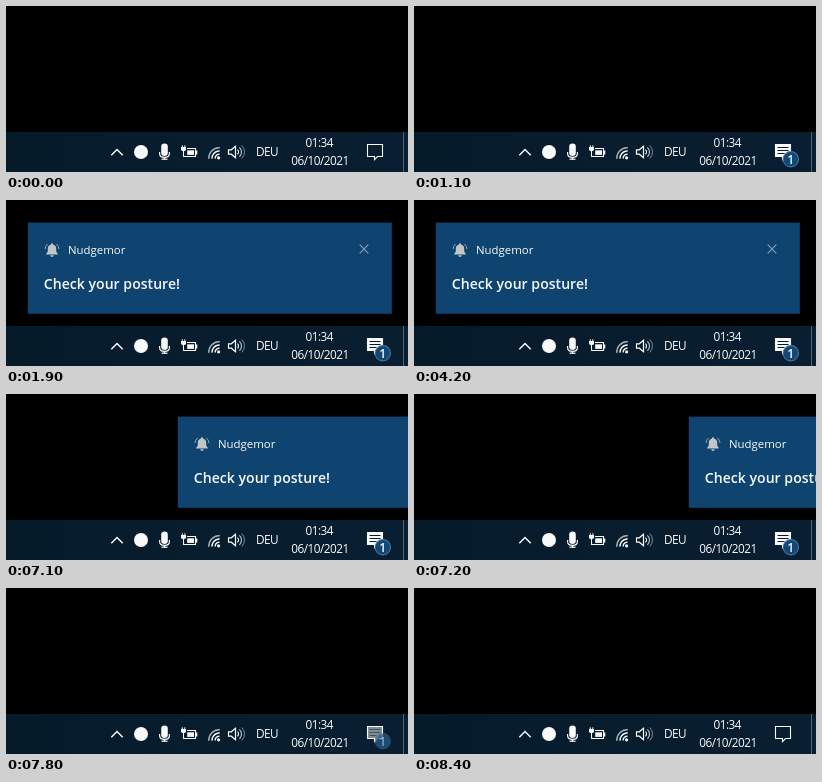
Write an HTML page with a canvas that moves like this. It is 402x166 px and loops after 8.6 s.

```html
<!DOCTYPE html>
<html lang="en">
<head>
<meta charset="utf-8">
<title>Taskbar reminder</title>
<style>
  html, body { margin: 0; width: 100%; height: 100%; overflow: hidden; background: #000; }
  canvas { display: block; width: 402px; height: 166px; }
</style>
</head>
<body>
<canvas id="stage" width="402" height="166"></canvas>
<script>
const ctx = document.getElementById('stage').getContext('2d');
const LOOP = 8600;
const STEP = 100;
const FONT = '"Open Sans", "Noto Sans", sans-serif';
const WHITE = '#f8fafa';
const BAR = '#071c2d';

function text(value, x, y, size, { weight = 500, align = 'left', tracking = 0 } = {}) {
  ctx.font = `${weight} ${size}px ${FONT}`;
  ctx.letterSpacing = `${tracking}px`;
  ctx.textAlign = align;
  ctx.fillStyle = WHITE;
  ctx.fillText(value, x, y);
}

function trayText(value, x, y) {
  text(value, x, y, 11.8, { align: 'center', tracking: -0.5 });
}

function stroke(path, width = 1.2, color = WHITE) {
  ctx.lineWidth = width;
  ctx.strokeStyle = color;
  ctx.stroke(new Path2D(path));
}

function fill(path, color = WHITE) {
  ctx.fillStyle = color;
  ctx.fill(new Path2D(path));
}

function rect(x, y, w, h, color = WHITE) {
  ctx.fillStyle = color;
  ctx.fillRect(x, y, w, h);
}

function disc(x, y, r, color = WHITE) {
  ctx.beginPath();
  ctx.arc(x, y, r, 0, Math.PI * 2);
  ctx.fillStyle = color;
  ctx.fill();
}

function arc(x, y, r, from, to, width, color = WHITE) {
  ctx.beginPath();
  ctx.arc(x, y, r, from * Math.PI, to * Math.PI);
  ctx.lineWidth = width;
  ctx.strokeStyle = color;
  ctx.stroke();
}

function drawTray() {
  stroke('M105.3 149.3 L111 143.4 L116.7 149.3', 1.4);
  disc(135, 146, 7);

  // microphone
  fill('M155.2 140.5 a3.3 3 0 0 1 6.6 0 v6.5 a3.3 3 0 0 1 -6.6 0 Z');
  stroke('M153.6 146 v1.7 q0 3.6 4.9 3.6 q4.9 0 4.9 -3.6 v-1.7', 1.2);
  rect(157.8, 151, 1.4, 2.5);
  rect(155.5, 152.6, 6, 1.2);

  // charging battery
  stroke('M181 142.5 H189.5 V150.5 H177.5 V148', 1.1);
  rect(181.2, 144.3, 6.8, 4.6);
  rect(190, 144.5, 1.3, 4);
  fill('M175 141 h5 v2.3 q0 2 -2.5 2 q-2.5 0 -2.5 -2 Z');
  stroke('M176.3 139.3 v2 M178.8 139.3 v2 M177.5 145 v3', 1);

  // wireless signal
  disc(212.6, 151.8, 1.6);
  [4, 7.2, 10.4].forEach((r, i) =>
    arc(213.2, 152.2, r, 0.98, 1.52, 1.4, i === 2 ? '#a3adb5' : WHITE));

  // speaker
  stroke('M222.5 143.8 H225.3 L229.5 140.2 V151.8 L225.3 148.2 H222.5 Z', 1.2);
  arc(229.5, 146, 3, -0.28, 0.28, 1.1);
  arc(229.5, 146, 6, -0.28, 0.28, 1.1, '#c4ccd1');
  arc(229.5, 146, 9, -0.26, 0.26, 1, '#7d8c98');

  trayText('DEU', 261, 150);
  trayText('01:34', 313.3, 141);
  trayText('06/10/2021', 314, 159);
}

function drawActionCenter(badge) {
  const bubble = 'M361.5 138.5 H376.5 V150.5 H371.5 L368.5 153.7 V150.5 H361.5 Z';
  stroke(bubble, 1.1);
  if (!badge) return;
  ctx.save();
  ctx.globalAlpha = badge;
  fill(bubble);
  for (const [y, w] of [[141, 11], [144, 11], [147, 7]]) rect(363.5, y, w, 1, BAR);
  disc(376.8, 153.3, 8.2, '#4b7ea5');
  disc(376.8, 153.3, 7.2, '#114876');
  text('1', 376.6, 157.5, 12, { weight: 600, align: 'center' });
  ctx.restore();
}

function drawTaskbar(badge) {
  const shade = ctx.createLinearGradient(0, 0, 402, 0);
  shade.addColorStop(0, '#051b2a');
  shade.addColorStop(1, '#0a1e31');
  rect(0, 126, 402, 40, shade);
  drawTray();
  drawActionCenter(badge);
  rect(397, 126, 1, 40, '#52616d');
}

function drawBell() {
  const tone = '#c3c6c8';
  fill('M46 43.2 q1.1 0 1.1 1.2 q3.1 1 3.1 4.3 v2.9 l1.5 2.1 v.7 H40.3 v-.7 l1.5 -2.1 v-2.9 q0 -3.3 3.1 -4.3 q0 -1.2 1.1 -1.2 Z', tone);
  fill('M44.2 55.2 h3.6 q-.3 1.7 -1.8 1.7 q-1.5 0 -1.8 -1.7 Z', tone);
  stroke('M41.6 44 q-2.4 1.8 -2.6 5 M50.4 44 q2.4 1.8 2.6 5', 1, '#8fa3b3');
}

function drawToast(offset) {
  ctx.save();
  ctx.translate(offset, 0);
  rect(21.8, 22.6, 364, 91.2, '#0f4470');
  drawBell();
  text('Nudgemor', 62, 54, 11.4);
  stroke('M353.7 44.7 L362.3 53.3 M362.3 44.7 L353.7 53.3', 1.1, '#86a2b9');
  text('Check your posture!', 37.8, 89, 14.1, { weight: 600 });
  ctx.restore();
}

function badgeLevel(t) {
  if (t < 900 || t >= 7900) return 0;
  if (t < 1100) return t < 1000 ? 0.4 : 0.8;
  return t < 7800 ? 1 : 0.5;
}

// The toast leaves to the right, slowing down.
function toastOffset(t) {
  if (t < 7100) return 0;
  const left = Math.max(0, 1 - (t - 6989) / 500);
  return Math.round(380 * (1 - left * left));
}

function render() {
  const t = Math.floor((performance.now() % LOOP) / STEP) * STEP;
  rect(0, 0, 402, 166, '#000');
  if (t >= 1600 && t < 7500) drawToast(toastOffset(t));
  drawTaskbar(badgeLevel(t));
  requestAnimationFrame(render);
}

render();
</script>
</body>
</html>
```
